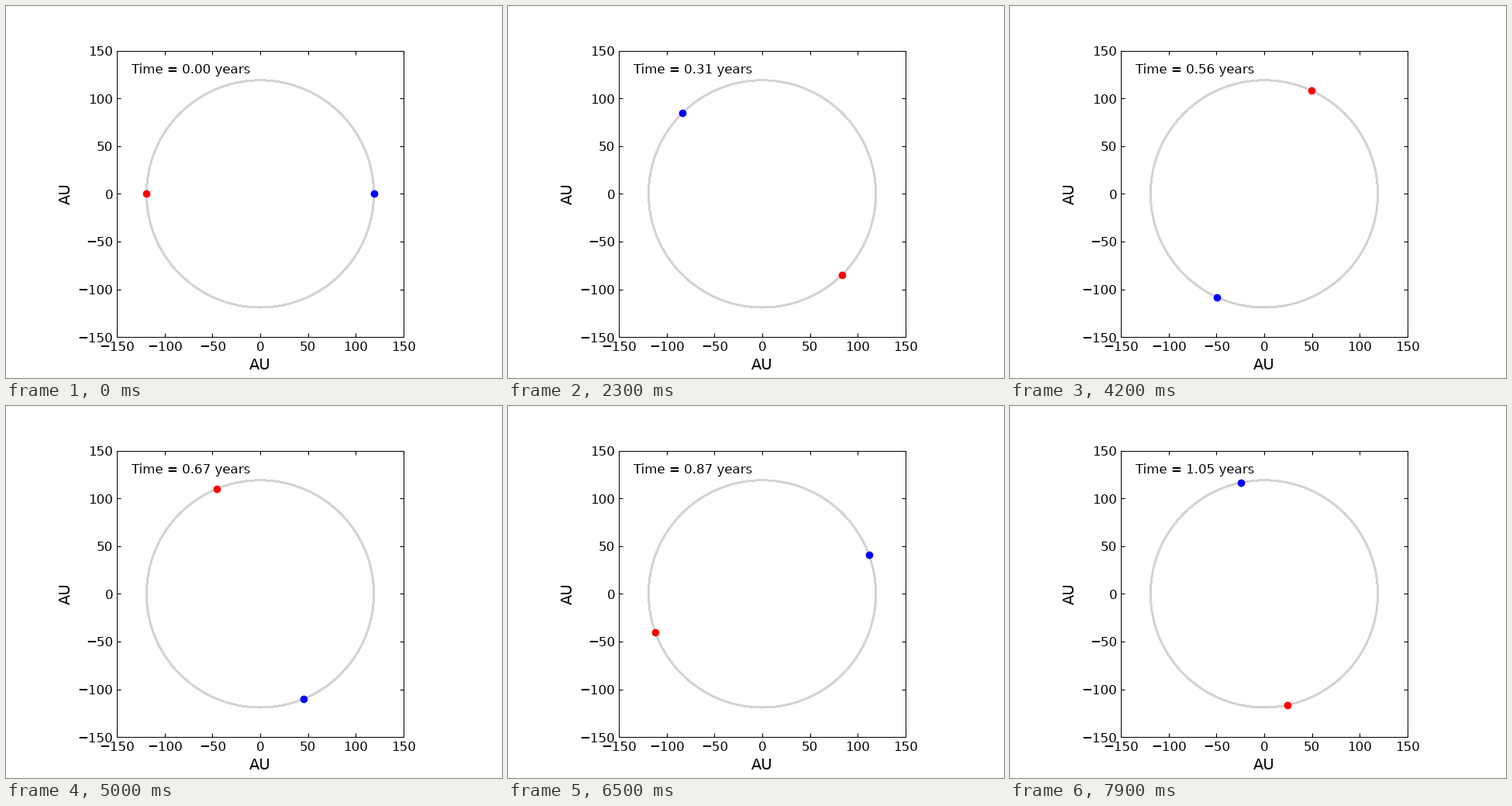
A matplotlib script for the animation above (8000 ms loop, 640x480 px).

```python
import numpy as np
import matplotlib.pyplot as plt
from matplotlib.animation import FuncAnimation

FRAMES = 80
INTERVAL = 100            # ms
RADIUS = 119.0            # AU
STEP = np.radians(5.845)  # orbital angle per frame
YEARS = 1 / 75            # time per frame
TURNS = 10                # laps in the drawn trail

plt.rcParams.update({
    "font.family": "DejaVu Sans",
    "font.size": 12,
    "text.hinting": "default",
    "axes.labelsize": 14,
    "axes.linewidth": 0.72,
    "xtick.direction": "in",
    "ytick.direction": "in",
    "xtick.top": True,
    "ytick.right": True,
})

fig, ax = plt.subplots(figsize=(6.4, 4.8), dpi=100)
ax.set_aspect("equal")
ax.set(xlim=(-150, 150), ylim=(-150, 150), xlabel="AU", ylabel="AU")
ticks = np.arange(-150, 151, 50)
ax.set_xticks(ticks)
ax.set_yticks(ticks)

# Repeated laps build up the firm edge of the trail.
phi = np.linspace(0, 2 * np.pi * TURNS, 360 * TURNS + 1)
for side in (1, -1):
    ax.plot(side * RADIUS * np.cos(phi), side * RADIUS * np.sin(phi),
            color="lightgray", lw=1.5)
red, = ax.plot([], [], "o", color="red")
blue, = ax.plot([], [], "o", color="blue")
clock = ax.text(0.05, 0.92, "", transform=ax.transAxes)


def update(i):
    x, y = RADIUS * np.cos(i * STEP), RADIUS * np.sin(i * STEP)
    blue.set_data([x], [y])
    red.set_data([-x], [-y])
    clock.set_text(f"Time = {i * YEARS:.2f} years")
    return red, blue, clock


anim = FuncAnimation(fig, update, frames=FRAMES, interval=INTERVAL,
                     repeat=True, repeat_delay=0)
plt.show()
```
